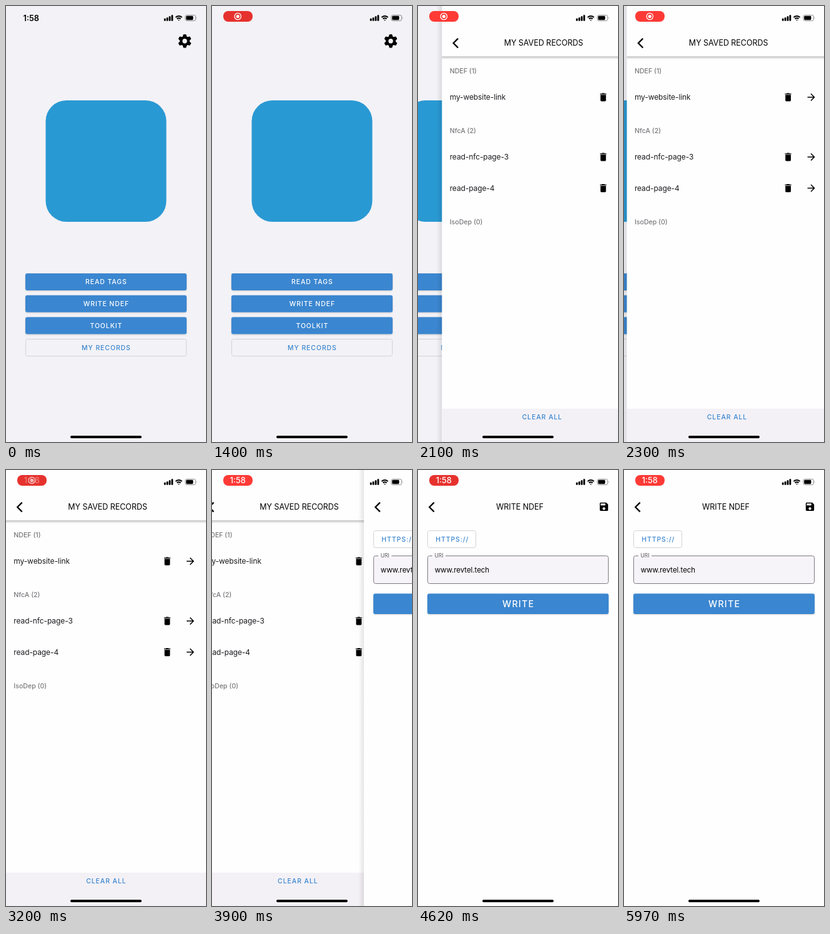
An HTML page for the animation above (6070 ms loop, 320 px wide and 693 px high).

```html
<!DOCTYPE html>
<html lang="en">
<head>
<meta charset="utf-8">
<title>NFC records</title>
<style>
  html, body { margin: 0; width: 100%; height: 100%; overflow: hidden; background: #fff; }
  svg { display: block; width: 320px; height: 693px; font-family: Inter, Roboto, "Liberation Sans", sans-serif; }
  .title { font-size: 12.5px; letter-spacing: -.03px; text-anchor: middle; }
  .row { font-size: 12px; letter-spacing: -.1px; fill: #1c1b1f; }
  .group { font-size: 10.6px; font-weight: 500; fill: #79787c; }
  .btn { font-size: 10.5px; font-weight: 500; letter-spacing: .9px; text-anchor: middle; }
  .big { font-size: 14.2px; letter-spacing: 1.2px; }
  .blue { fill: #3b86d0; }
  .white { fill: #fff; }
  .clock { text-anchor: middle; font-weight: 600; font-size: 12.8px; }
  .line { fill: none; stroke: #000; stroke-width: 2.3; }
</style>
</head>
<body>
<svg viewBox="0 0 320 693">
  <defs>
    <linearGradient id="edge">
      <stop offset="0" stop-color="#000" stop-opacity="0"/>
      <stop offset="1" stop-color="#000" stop-opacity=".1"/>
    </linearGradient>
    <linearGradient id="drop" x2="0" y2="1">
      <stop offset="0" stop-color="#000" stop-opacity=".24"/>
      <stop offset="1" stop-color="#000" stop-opacity="0"/>
    </linearGradient>
    <filter id="lift" x="-5%" y="-20%" width="110%" height="150%">
      <feDropShadow dx="0" dy=".8" stdDeviation=".9" flood-opacity=".2"/>
    </filter>
    <path id="bin" d="M6 19c0 1.1.9 2 2 2h8c1.1 0 2-.9 2-2V7H6zM19 4h-3.5l-1-1h-5l-1 1H5v2h14z"/>
    <path id="arrow" d="M4 11v2h12.17l-5.58 5.59L12 20l8-8-8-8-1.41 1.41L16.17 11z"/>
    <path id="save" d="M17 3H5c-1.11 0-2 .9-2 2v14c0 1.1.89 2 2 2h14c1.1 0 2-.9 2-2V7zm-5 16c-1.66 0-3-1.34-3-3s1.34-3 3-3 3 1.34 3 3-1.34 3-3 3zm3-10H5V5h10z"/>
    <path id="tooth" d="M-3.6-6L-2.3-10.3Q-2.2-10.7-1.8-10.7H1.8Q2.2-10.7 2.3-10.3L3.6-6z"/>
  </defs>
  <g id="home"></g>
  <g id="list"></g>
  <g id="write"></g>
  <g id="status">
    <text id="time" class="clock" x="40.3" y="24">1:58</text>
    <g id="pill">
      <rect id="pillBg" x="18" y="8" width="47" height="17" rx="8"/>
      <text id="pillTime" class="clock white" style="font-weight:500" x="41.3" y="21">1:58</text>
      <g id="dot" class="white">
        <circle cx="41.3" cy="16.5" r="5.2" fill="none" stroke="#fff" stroke-width="1.3"/>
        <circle cx="41.3" cy="16.5" r="2.6"/>
      </g>
    </g>
    <g id="bars"></g>
    <g fill="none" stroke="#000" stroke-width="2">
      <path d="M271.4 18.1a7.2 7.2 0 0 1 10.2 0M273.6 20.5a4.1 4.1 0 0 1 5.8 0"/>
      <path d="M274.9 21.9h3.2l-1.6 1.7z" fill="#000" stroke="none"/>
    </g>
    <rect x="286.9" y="14.5" width="16.6" height="9" rx="2.6" fill="none" stroke="#000" stroke-opacity=".42"/>
    <rect x="288.2" y="15.8" width="11.2" height="6.4" rx="1.4"/>
    <path d="M304.7 17.5q1.5 1.5 0 3z" opacity=".45"/>
  </g>
  <rect x="103" y="683" width="114" height="4" rx="2"/>
</svg>
<script>
const LOOP = 6070;
const $ = id => document.getElementById(id);

const text = (cls, x, y, s) => `<text class="${cls}" x="${x}" y="${y}">${s}</text>`;
const icon = (id, x, y, k) =>
  `<use href="#${id}" transform="translate(${x} ${y}) scale(${k}) translate(-12 -12)"/>`;
const box = (x, y, w, h, attrs) => `<rect x="${x}" y="${y}" width="${w}" height="${h}" ${attrs}/>`;
const solid = (x, y, w, h) => box(x, y, w, h, 'rx="3" class="blue" filter="url(#lift)"');
const outline = (x, y, w, h, fill) => box(x, y, w, h, `rx="3" fill="${fill}" stroke="#d3d2d8"`);
const card = () => box(-9, 0, 9, 693, 'fill="url(#edge)"') + box(0, 0, 320, 693, 'fill="#fefefe"');
const back = () => '<path class="line" d="M25.7 51.6L18.3 59l7.4 7.4"/>';

function buildHome() {
  let s = box(0, 0, 320, 693, 'fill="#f3f2f6"');
  s += '<g transform="translate(286 55.7)"><circle r="5.7" fill="none" stroke="#000" stroke-width="4"/>';
  for (let a = 0; a < 360; a += 60) s += `<use href="#tooth" transform="rotate(${a})"/>`;
  s += '</g>' + box(63.5, 150, 193, 193, 'rx="33" fill="#2999d3"');
  ['READ TAGS', 'WRITE NDEF', 'TOOLKIT'].forEach((label, i) => {
    const y = 425 + i * 34.8;
    s += solid(31, y, 258, 27) + text('btn white', 160.4, y + 17.2, label);
  });
  return s + outline(31.5, 529.5, 257, 27, 'none') + text('btn blue', 160.4, 546.9, 'MY RECORDS');
}

function buildList() {
  let s = card() + box(0, 80, 320, 5, 'fill="url(#drop)"') + back();
  s += text('title', 162.6, 63.4, 'MY SAVED RECORDS');
  [['NDEF (1)', 107], ['NfcA (2)', 202], ['IsoDep (0)', 346.8]]
    .forEach(([name, y]) => s += text('group', 12.3, y, name));
  [['my-website-link', 145], ['read-nfc-page-3', 240], ['read-page-4', 289.5]].forEach(([name, y]) => {
    s += text('row', 12.3, y + 4, name) + icon('bin', 258, y, .73) + icon('arrow', 295, y, .75);
  });
  return s + box(0, 640, 320, 53, 'fill="#f3f1f6"') + text('btn blue', 160.4, 657, 'CLEAR ALL');
}

function buildWrite() {
  return card() + back() + text('title', 163, 63.4, 'WRITE NDEF') + icon('save', 297.5, 58.4, .74) +
    outline(15.5, 96.5, 77, 27, '#fff') + text('btn blue', 54.8, 114, 'HTTPS://') +
    box(15.5, 136.5, 289, 44, 'rx="3" fill="#f6f4f9" stroke="#7d7a80"') +
    box(23, 135, 21, 4, 'fill="#fbfafc"') +
    '<text x="26.5" y="139.2" font-size="8.5" fill="#5d5b60">URI</text>' +
    '<text x="26.7" y="162.8" font-size="11.5" letter-spacing="-.05">www.revtel.tech</text>' +
    solid(15, 196.5, 290, 32.5) + text('btn big white', 160.6, 218.3, 'WRITE');
}

$('home').innerHTML = buildHome();
$('list').innerHTML = buildList();
$('write').innerHTML = buildWrite();
$('bars').innerHTML = [4, 5.5, 7.5, 9.5]
  .map((h, i) => box(252.8 + i * 3.9, 23.7 - h, 2.8, h, 'rx=".8"')).join('');

const ramp = (t, a, b) => Math.min(1, Math.max(0, (t - a) / (b - a)));

// Critically damped spring used by both page pushes
function push(t, start) {
  const u = Math.max(0, t - start) * .0128;
  return u > 8.5 ? 1 : 1 - (1 + u) * Math.exp(-u);
}

const slide = (id, x) => $(id).setAttribute('transform', `translate(${x.toFixed(2)} 0)`);
const fade = (id, o) => $(id).setAttribute('opacity', o.toFixed(3));
const mix = (a, b, k) => Math.round(a + (b - a) * k);

// A waiting page is hidden so its edge shadow does not reach the stage
function enter(id, p, x) {
  $(id).setAttribute('visibility', p > 0 ? 'visible' : 'hidden');
  slide(id, x);
}

function draw(t) {
  const p = push(t, 1815), q = push(t, 3828);
  slide('home', -96 * p);
  enter('list', p, 320 * (1 - p) - 96 * q);
  enter('write', q, 320 * (1 - q));

  const shown = ramp(t, 70, 300);
  const swap = ramp(t, 2980, 3600);
  fade('time', 1 - shown);
  fade('pill', shown);
  fade('dot', ramp(t, 180, 480) * (1 - swap));
  fade('pillTime', swap);

  const m = t % 1800;
  const glow = t < 500 ? 1 : ramp(m, 120, 270) * (1 - ramp(m, 820, 1000));
  $('pillBg').setAttribute('fill', `rgb(${mix(230, 254, glow)},${mix(50, 58, glow)},${mix(46, 54, glow)})`);
}

const t0 = performance.now();
function tick() {
  draw((performance.now() - t0) % LOOP);
  requestAnimationFrame(tick);
}
draw(0);
requestAnimationFrame(tick);
</script>
</body>
</html>
```
